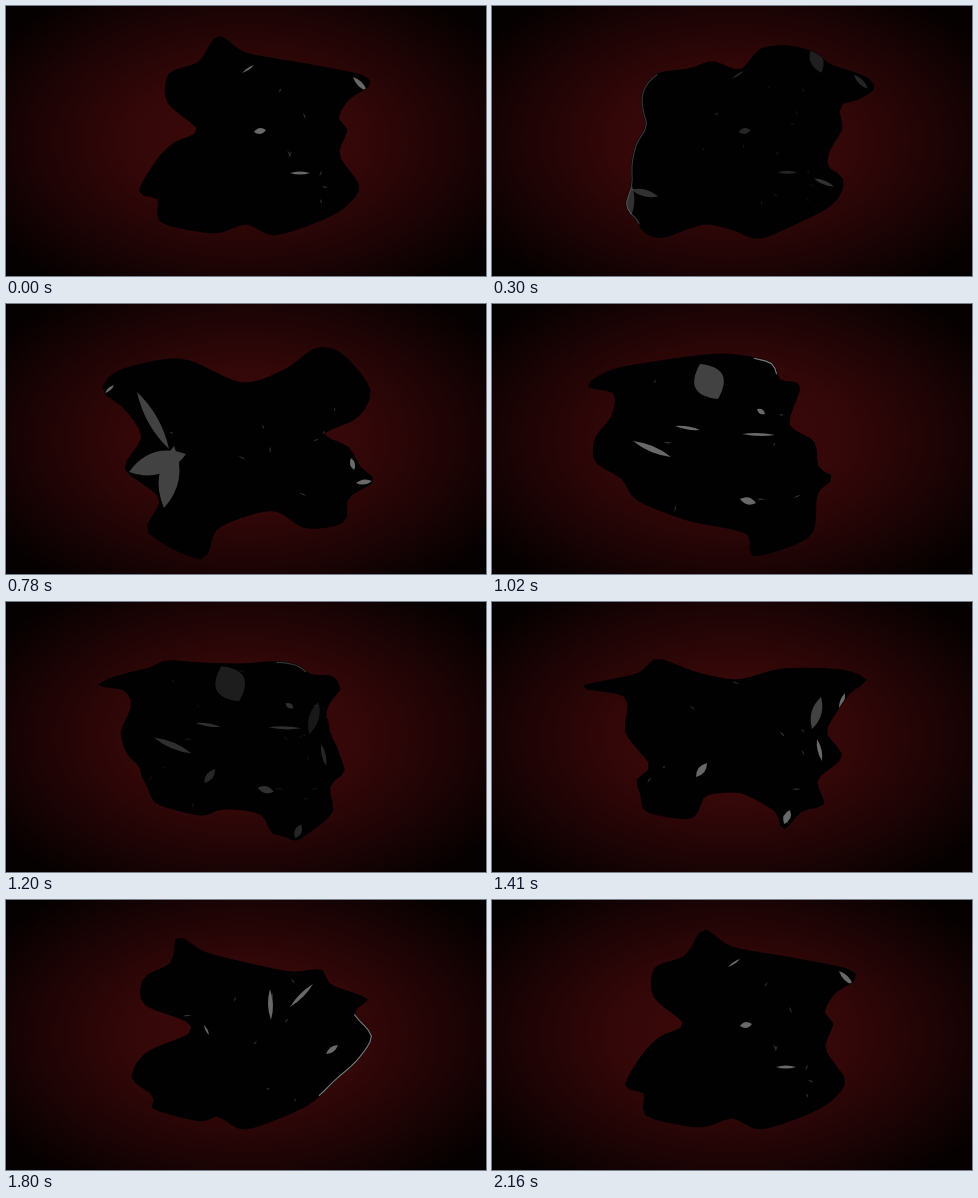
Write an HTML page that moves like this. It is 480 by 270 pixels and loops after 2.19 s.

```html
<!DOCTYPE html>
<html lang="en">
<head>
<meta charset="utf-8">
<title>Black liquid</title>
<style>
  html, body { margin: 0; width: 100%; height: 100%; overflow: hidden; background: #050101; }
  svg { display: block; width: 100%; height: 100%; }
</style>
</head>
<body>
<svg viewBox="0 0 480 270">
  <defs>
    <radialGradient id="glow" gradientUnits="userSpaceOnUse" cx="0" cy="0" r="1"
      gradientTransform="translate(240 135) scale(292 178)">
      <stop offset="0" stop-color="#3e090a"/>
      <stop offset=".4" stop-color="#330708"/>
      <stop offset=".7" stop-color="#1e0405"/>
      <stop offset="1" stop-color="#060101"/>
    </radialGradient>
    <filter id="soft" x="-20%" y="-20%" width="140%" height="140%"><feGaussianBlur stdDeviation=".6"/></filter>
    <clipPath id="inside"><path id="mask"/></clipPath>
  </defs>
  <rect width="480" height="270" fill="url(#glow)"/>
  <path id="blob" fill="#010101" stroke="#010101"/>
  <g clip-path="url(#inside)"><g id="shine" filter="url(#soft)"></g></g>
</svg>
<script>
const LOOP = 2190, SPAN = 2160, STEP = 30, PER_SIDE = 26, STREAKS = 8;

// outline: clockwise key points, split into sides at left, top, right and bottom
// glints: lens-shaped reflections "from to width"; rim: lit share of the outline
const poses = [
  { at: 0,
    outline: `168,137 192,124 162,97 163,68 193,56 212,30
      |240,47 300,58 355,69 364,79 343,93 332,112
      |341,124 333,149 353,181 335,204 300,220 266,229
      |240,218 208,227 155,216 152,193 133,186 151,154`,
    glints: '347,71 361,85 5|248,126 260,124 6|284,167 304,167 3|236,67 248,59 2' },
  { at: 540,
    outline: `125,143 126,97 145,72 190,66 230,77
      |255,77 268,40 300,30 330,38 342,56 366,67 398,84 380,97 358,97
      |357,125 335,160 349,170 340,197 310,214 268,232
      |240,227 212,212 172,241 134,225 139,188 130,166`,
    glints: '324,36 334,62 13|139,188 135,224 8|137,190 164,197 7|322,172 342,180 4', rim: [-.12, .13] },
  { at: 780,
    outline: `121,157 136,132 118,104 97,87 112,67 175,55
      |236,79 280,65 310,44 336,50 364,85 352,113 317,130
      |342,143 355,164 368,177 342,194 338,218 300,224 270,207
      |240,212 210,226 195,255 142,228 154,195 122,169`,
    glints: '131,88 163,145 10|123,168 180,150 22|168,142 158,204 20|345,154 348,166 5|350,179 366,177 5|99,89 108,81 3' },
  { at: 1020,
    outline: `104,133 120,112 122,89 95,82 120,66 175,56
      |231,50 278,58 288,76 308,82 297,120
      |322,138 326,163 341,174 325,190 318,232 262,252 258,232
      |240,225 195,216 145,196 130,175 103,157`,
    glints: '208,60 226,95 30|141,137 179,153 6|248,195 264,199 7|183,122 208,126 3|250,130 283,131 3|265,105 273,110 5',
    rim: [.3, .36] },
  { at: 1410,
    outline: `134,131 134,95 89,85 145,72 165,57 203,70
      |245,78 290,67 350,68 374,78 357,92 337,122
      |335,133 350,155 325,178 332,202 310,209 291,228 284,210 255,193
      |240,190 213,194 200,216 155,210 149,193 145,178 158,163`,
    glints: '329,95 320,127 10|325,137 330,159 4|204,175 215,161 7|298,208 292,222 7|353,91 347,108 4' },
  { at: 1800,
    outline: `183,134 180,121 138,104 138,78 165,63 172,37 198,52
      |240,63 285,72 315,70 325,85 361,99 348,112
      |366,136 352,160 330,180 300,206
      |240,229 212,216 195,221 148,209 148,196 126,178 140,153`,
    glints: '264,89 265,120 5|284,107 307,84 4|320,154 332,145 5|198,125 203,135 2', rim: [.46, .63] }
];

const $ = id => document.getElementById(id);
const mod = (a, n) => (a % n + n) % n;
const mix = (a, b, u) => a + (b - a) * u;
const pair = text => text.split(',').map(Number);

let seed = 7;
const random = () => (seed = seed * 16807 % 2147483647) / 2147483647;

// Cubic blend from b to c; the slopes follow the neighbours a and d
function blend(a, b, c, d, u, leave, arrive) {
  const ease = u * u * (3 - 2 * u), out = u * (1 - u) ** 2 * leave, into = u * u * (u - 1) * arrive;
  return b.map((v, x) => mix(v, c[x], ease) + out * (c[x] - a[x]) + into * (d[x] - v));
}

function evenly(curve, count) {
  const dist = [0];
  for (let i = 1; i < curve.length; i++)
    dist.push(dist[i - 1] + Math.hypot(curve[i][0] - curve[i - 1][0], curve[i][1] - curve[i - 1][1]));
  let j = 1;
  return Array.from({ length: count }, (_, k) => {
    const goal = dist[dist.length - 1] * k / count;
    while (dist[j] < goal) j++;
    const u = (goal - dist[j - 1]) / (dist[j] - dist[j - 1] || 1);
    return curve[j].map((v, x) => mix(curve[j - 1][x], v, u));
  });
}

function traceOutline(text) {
  const sides = text.split('|').map(side => side.trim().split(/\s+/).map(pair));
  const all = sides.flat(), key = i => all[mod(i, all.length)];
  let start = 0;
  return sides.flatMap(side => {
    const curve = [], end = start + side.length;
    for (let i = start; i < end; i++)
      for (let u = 0; u < 1; u += 1 / 8)
        curve.push(blend(key(i - 1), key(i), key(i + 1), key(i + 2), u, .42, .42));
    curve.push(key(end));
    start = end;
    return evenly(curve, PER_SIDE);
  });
}

function addPath(attributes) {
  const el = document.createElementNS('http://www.w3.org/2000/svg', 'path');
  for (const name in attributes) el.setAttribute(name, attributes[name]);
  $('shine').append(el);
  return el;
}

// Each reflection is carried along by the outline closest to it
function makeGlint(ring, [x1, y1], [x2, y2], width, level) {
  const mx = (x1 + x2) / 2, my = (y1 + y2) / 2, length = Math.hypot(x2 - x1, y2 - y1);
  const nx = (y1 - y2) / length * width, ny = (x2 - x1) / length * width;
  const el = addPath({
    d: `M${x1},${y1}Q${mx + nx},${my + ny} ${x2},${y2}Q${mx - nx},${my - ny} ${x1},${y1}`,
    fill: `rgb(${level},${level},${level})`
  });
  const pull = ring.map(([x, y]) => 1 / (60 + (x - mx) ** 2 + (y - my) ** 2));
  const sum = pull.reduce((a, b) => a + b);
  return { el, pull: pull.map(w => w / sum) };
}

function makeStreak(ring) {
  const x = mix(150, 330, random()), y = mix(75, 205, random());
  const angle = random() * Math.PI, length = mix(3, 9, random());
  return makeGlint(ring, [x, y], [x + length * Math.cos(angle), y + length * Math.sin(angle)], 1.2, 55);
}

for (const pose of poses) {
  pose.ring = traceOutline(pose.outline);
  pose.shine = pose.glints.split('|').map(text => {
    const [from, to, width] = text.split(' ');
    return makeGlint(pose.ring, pair(from), pair(to), +width, width > 9 ? 66 : 105);
  });
  for (let k = 0; k < STREAKS; k++) pose.shine.push(makeStreak(pose.ring));
  if (pose.rim) pose.edge = addPath({ fill: 'none', stroke: '#777', 'stroke-width': 2.4 });
}

const poseAt = i => poses[mod(i, poses.length)];
const timeAt = i => poseAt(i).at + Math.floor(i / poses.length) * SPAN;
const line = ring => 'M' + ring.map(p => p.map(v => v.toFixed(1))).join('L');

function shapeAt(i, u) {
  const [a, b, c, d] = [-1, 0, 1, 2].map(k => poseAt(i + k).ring);
  const gap = timeAt(i + 1) - timeAt(i);
  const leave = .6 * gap / (timeAt(i + 1) - timeAt(i - 1));
  const arrive = .6 * gap / (timeAt(i + 2) - timeAt(i));
  return b.map((p, k) => blend(a[k], p, c[k], d[k], u, leave, arrive));
}

function drawShine(pose, ring, strength) {
  for (const { el, pull } of pose.shine) {
    const shift = [0, 1].map(x => pull.reduce((s, w, k) => s + w * (ring[k][x] - pose.ring[k][x]), 0));
    el.setAttribute('opacity', strength);
    el.setAttribute('transform', `translate(${shift})`);
  }
  if (!pose.edge) return;
  const [from, to] = pose.rim.map(share => Math.round(share * ring.length));
  const lit = Array.from({ length: to - from }, (_, k) => ring[mod(from + k, ring.length)]);
  pose.edge.setAttribute('d', line(lit));
  pose.edge.setAttribute('opacity', strength);
}

function draw(ms) {
  const t = Math.floor(mod(ms, LOOP) / STEP) * STEP % SPAN;
  const i = poses.findLastIndex(pose => pose.at <= t);
  const u = (t - timeAt(i)) / (timeAt(i + 1) - timeAt(i));
  const ring = shapeAt(i, u);
  for (const id of ['blob', 'mask']) $(id).setAttribute('d', line(ring) + 'Z');
  for (const pose of poses)
    drawShine(pose, ring, pose === poseAt(i) ? (1 - u) ** 1.3 : pose === poseAt(i + 1) ? u ** 1.3 : 0);
}

const begin = performance.now();
function tick() {
  draw(performance.now() - begin);
  requestAnimationFrame(tick);
}
tick();
</script>
</body>
</html>
```
